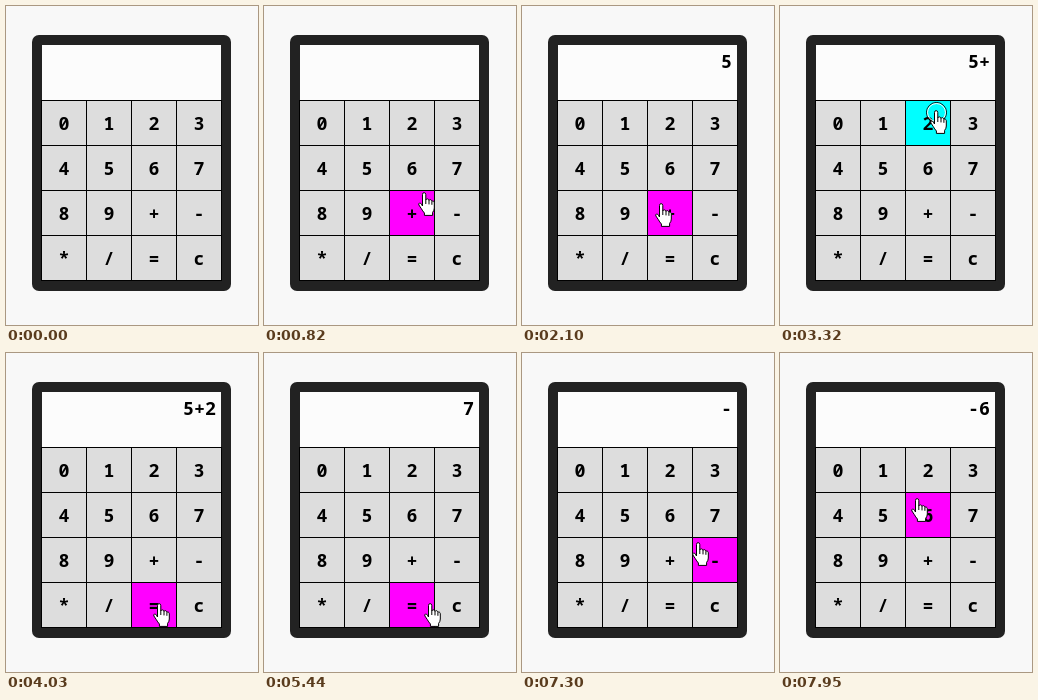
Write an HTML page with a canvas that moves like this. It is 252 px wide and 319 px high and loops after 8 s.

```html
<!DOCTYPE html>
<html lang="en">
<head>
<meta charset="utf-8">
<title>Calculator</title>
<style>
html, body { margin: 0; width: 100%; height: 100%; overflow: hidden; background: #f8f8f8; }
canvas { display: block; }
</style>
</head>
<body>
<canvas id="stage" width="252" height="319"></canvas>
<script>
const ctx = document.getElementById('stage').getContext('2d');
const LOOP = 8000, LEFT = 36, TOP = 95, CELL = 45;
const KEYS = '0123456789+-*/=c';
const ENTRY = { x: 229, y: 222 };

// Each action: pointer travels to (x, y) in a few steps, presses, then releases and updates the display.
const actions = [
  [107, 163, 620, 1220, 13, 1440, 1690, '5'],
  [139, 199, 1840, 2100, 7, 2300, 2540, '5+'],
  [156, 106, 2740, 2950, 5, 3260, 3470, '5+2'],
  [153, 252, 3650, 4030, 8, 4190, 4450, '7'],
  [196, 252, 5440, 5640, 5, 5880, 6110, ''],
  [193, 211, 6390, 6600, 5, 6840, 7120, '-'],
  [137, 147, 7300, 7490, 5, 7700, 7950, '-6'],
].map(([x, y, start, end, steps, press, release, text]) =>
  ({ x, y, start, end, steps, press, release, text }));

const hand = new Path2D(
  'M4.5 14V2.6Q4.5.6 6.1.6T7.8 2.6V8Q8.2 6.6 9.6 6.9T11 8.6Q11.4 7.4 12.6 7.7T13.9 9.6' +
  'Q14.4 8.7 15.3 9.1T16.3 10.8V16Q16.3 18.5 14.6 20.4V23.4H6.4V21Q4.6 19 3.3 16.6L.9 13' +
  'Q.3 11.6 1.4 11.1T3.4 12.2Z');
const knuckles = new Path2D('M7.8 8V12M11 8.6V12.4M13.9 9.6V12.8');

function stateAt(t) {
  const state = { pointer: null, text: '', ring: false, pressed: false };
  let from = ENTRY;
  for (const a of actions) {
    if (t < a.start) break;
    const step = Math.floor((t - a.start) / (a.end - a.start) * (a.steps - 1) + 1e-6) + 1;
    const f = Math.sin(Math.min(1, step / a.steps) * Math.PI / 2);
    state.pointer = {
      x: Math.round(from.x + (a.x - from.x) * f),
      y: Math.round(from.y + (a.y - from.y) * f),
    };
    state.ring = t >= a.press && t < a.release;
    state.pressed = state.ring && t >= a.press + 40;
    if (t >= a.release) state.text = a.text;
    from = a;
  }
  return state;
}

function box(color, x, y, w, h) {
  ctx.fillStyle = color;
  ctx.fillRect(x, y, w, h);
}

function label(text, x, y, align) {
  ctx.fillStyle = '#000';
  ctx.textAlign = align;
  ctx.fillText(text, x, y);
}

function circle(x, y, r, color) {
  ctx.strokeStyle = color;
  ctx.beginPath();
  ctx.arc(x, y, r, 0, 2 * Math.PI);
  ctx.stroke();
}

function drawPointer({ x, y }, ring) {
  ctx.lineWidth = 1;
  if (ring) {
    circle(x + 0.5, y + 0.5, 10, '#000');
    circle(x + 0.5, y + 0.5, 9, '#fff');
  }
  ctx.save();
  ctx.translate(x - 6, y - 2);
  ctx.fillStyle = '#fff';
  ctx.strokeStyle = '#000';
  ctx.fill(hand);
  ctx.stroke(hand);
  ctx.stroke(knuckles);
  ctx.restore();
}

function draw(t) {
  const { pointer, text, ring, pressed } = stateAt(t);
  box('#f8f8f8', 0, 0, 252, 319);
  ctx.fillStyle = '#222';
  ctx.beginPath();
  ctx.roundRect(26, 29, 199, 256, 7);
  ctx.fill();
  box('#fcfcfc', LEFT, 39, 179, 55);
  box('#000', LEFT - 1, TOP - 1, 181, 181);

  ctx.font = '700 18.33px "Noto Sans Mono", monospace';
  label(text, 210, 62, 'right');
  [...KEYS].forEach((key, i) => {
    const x = LEFT + i % 4 * CELL, y = TOP + Math.floor(i / 4) * CELL;
    const hover = pointer && pointer.x >= x && pointer.x < x + 44 && pointer.y >= y && pointer.y < y + 44;
    box(!hover ? '#ddd' : pressed ? '#0ff' : '#f0f', x, y, 44, 44);
    label(key, x + 22, y + 29, 'center');
  });
  if (pointer) drawPointer(pointer, ring);
}

function tick() {
  draw(performance.now() % LOOP);
  requestAnimationFrame(tick);
}
tick();
</script>
</body>
</html>
```
